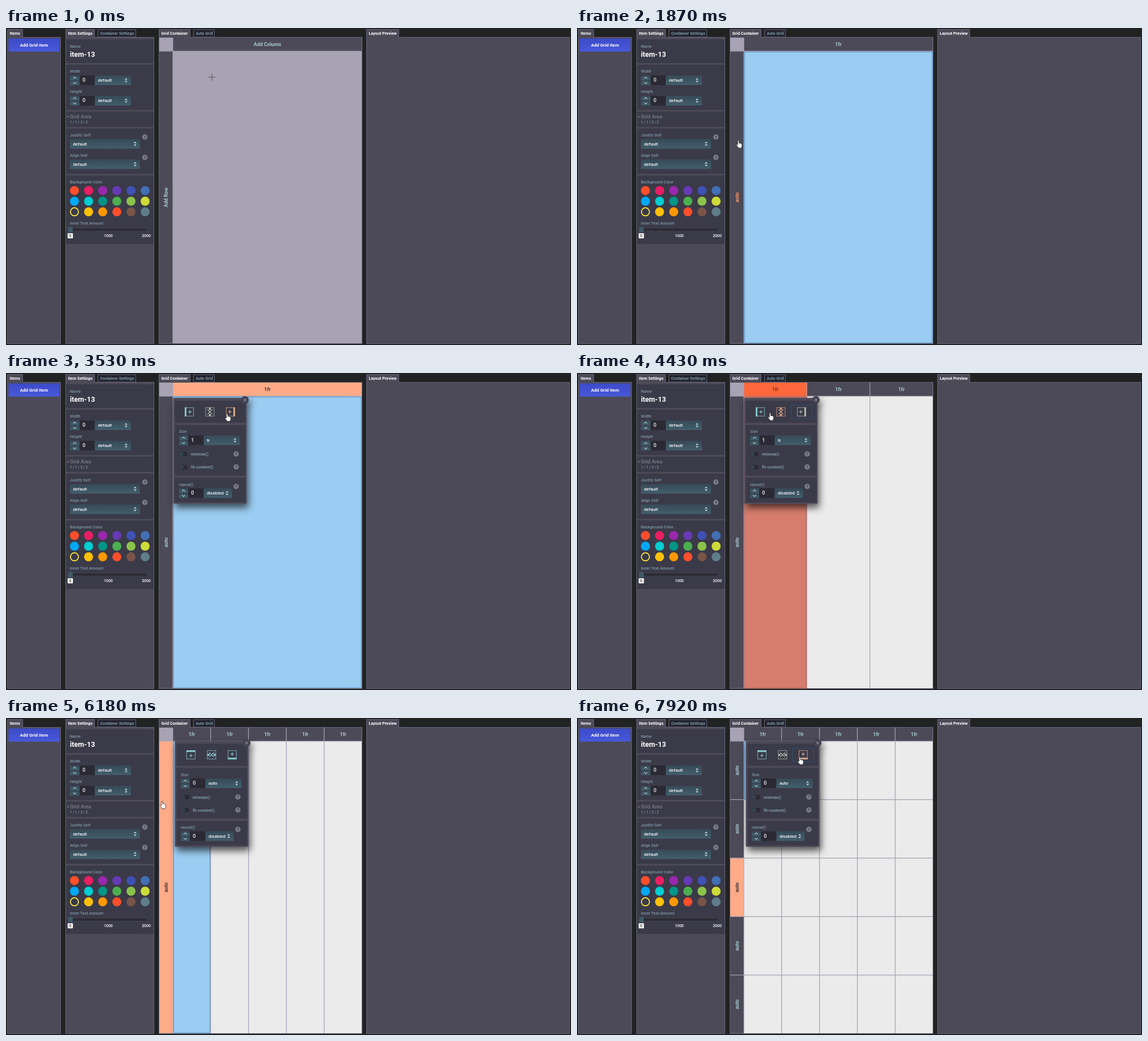
Recreate the animation shown at these times as an HTML page. Size 999 by 561 pixels, loop 8000 ms.

```html
<!DOCTYPE html>
<html lang="en">
<head>
<meta charset="utf-8">
<title>Grid editor</title>
<style>
html, body { margin: 0; width: 100%; height: 100%; overflow: hidden; background: #212323; }
svg { display: block; width: 100vw; height: 100vh; }
text { font-family: Roboto, Arial, sans-serif; white-space: pre; }
</style>
</head>
<body>
<svg viewBox="0 0 999 561" xmlns="http://www.w3.org/2000/svg">
  <defs>
    <linearGradient id="teal" x1="0" y1="0" x2="0" y2="1">
      <stop offset="0" stop-color="#374a57"/><stop offset="1" stop-color="#425e6c"/>
    </linearGradient>
    <linearGradient id="blue" x1="0" y1="0" x2="0" y2="1">
      <stop offset="0" stop-color="#3d4bc8"/><stop offset="1" stop-color="#4758da"/>
    </linearGradient>
    <filter id="shadow" x="-20%" y="-20%" width="140%" height="150%">
      <feDropShadow dx="3" dy="7" stdDeviation="6.5" flood-color="#000" flood-opacity=".65"/>
    </filter>
  </defs>
  <g id="base"></g>
  <g id="live"></g>
</svg>
<script>
const LOOP = 8000, STEP = 88;
const PANEL = '#4d4a58', SECTION = '#3b3a48', DARK = '#2b2a34', EDGE = '#666278', GAP = '#a7a3b4';
const MUTED = '#7e98a6', TEAL = '#86c5cb', HEAD = '#a6c9d0', CORAL = '#ffab87', ORANGE = '#ff9a68', RED = '#ff4713';

const rect = (x, y, w, h, fill, more = '') =>
  `<rect x="${x}" y="${y}" width="${w}" height="${h}" fill="${fill}" ${more}/>`;
const line = (d, color, width = 1) =>
  `<path d="${d}" fill="none" stroke="${color}" stroke-width="${width}"/>`;
const text = (x, y, s, size = 7.2, fill = MUTED, weight = 500, more = '') =>
  `<text x="${x}" y="${y}" font-size="${size}" fill="${fill}" font-weight="${weight}" ${more}>${s}</text>`;
const mid = 'text-anchor="middle"';

const rgb = c => [1, 3, 5].map(i => parseInt(c.slice(i, i + 2), 16));
function mix(a, b, t) {
  const p = rgb(a), q = rgb(b);
  return `rgb(${p.map((v, i) => Math.round(v + (q[i] - v) * t))})`;
}

// Widgets
const arrows = (x, y) =>
  `<path d="M${x - 2.6} ${y - 1}l2.6 -3l2.6 3zM${x - 2.6} ${y + 1}l2.6 3l2.6 -3z" fill="#b9cdd4"/>`;
const select = (x, y, w, label) =>
  rect(x, y, w, 17, 'url(#teal)') + text(x + 5.4, y + 11, label, 7.9, '#f2f4f6') + arrows(x + w - 8.7, y + 8.5);
const help = (x, y) =>
  `<circle cx="${x}" cy="${y}" r="4.7" fill="#7d7b8b"/>` + text(x, y + 2.7, '?', 7.5, SECTION, 700, mid);
function spinner(x, y, value, w = 17) {
  const c = x + w / 2;
  return rect(x, y, w, 8.2, 'url(#teal)') + rect(x, y + 9, w, 8, 'url(#teal)') +
    line(`M${c - 2.8} ${y + 5.4}l2.8 -2.6l2.8 2.6M${c - 2.8} ${y + 11.8}l2.8 2.6l2.8 -2.6`, '#b9cdd4', 1.1) +
    rect(x + w, y, 44 - w, 17, DARK) + text(x + w + 5.2, y + 11.3, value, 9, '#f2f4f6');
}
const toggle = (x, y) =>
  rect(x, y - 4, 15, 8, DARK, 'rx="4"') + `<circle cx="${x + 4}" cy="${y}" r="3.8" fill="#354350"/>`;

function tab(x, w, label, active) {
  return active
    ? rect(x + .5, 2.5, w - 1, 14, PANEL, `stroke="${EDGE}"`) + rect(x + 1, 15, w - 2, 3, PANEL) +
      text(x + 4.6, 12.2, label, 7.2, '#fff', 700)
    : rect(x + .5, 3, w - 1, 13, '#22232e', `stroke="${EDGE}"`) + text(x + 4.4, 12.2, label, 7.2, MUTED, 700);
}
const panel = (x, w, fill = PANEL) => rect(x + .5, 16.5, w - 1, 542, fill, `stroke="${EDGE}"`);

function drawBase() {
  const swatches = ('ff4e2b ea1e63 9b27af 673ab6 3f51b5 426fb5 02a8f3 00ced1 009587 ' +
    '4caf50 8bc34a cddc39 ring ffc107 ff9800 ff4e2b 795548 607d8b').split(' ');
  let s = panel(2, 95) + panel(105, 157) + panel(270, 360, GAP) + panel(637, 360);
  s += tab(2, 28, 'Items', true) + tab(105, 52, 'Item Settings', true) + tab(162, 68, 'Container Settings') +
    tab(270, 56, 'Grid Container', true) + tab(331, 38, 'Auto Grid') + tab(637, 58, 'Layout Preview', true);
  s += rect(271, 17, 24, 24, GAP);
  s += rect(4.5, 18.5, 90, 23.2, 'url(#blue)') + text(49.5, 32.7, 'Add Grid Item', 8, '#fff', 700, mid);
  for (const [y, h] of [[20, 42], [65, 80], [148, 27], [178, 80], [261, 121]]) s += rect(106, y, 155, h, SECTION);
  s += text(113, 35, 'Name') + text(113, 50.6, 'item-13', 12.5, '#fff', 700);
  [['Width', 84], ['Height', 120]].forEach(([label, y]) => {
    s += text(113, y - 4.8, label) + spinner(113, y, 0) + select(157, y, 64, 'default');
  });
  s += `<path d="M108.5 154.8l2.4 2.2l-2.4 2.2z" fill="#858393"/>` +
    text(113, 160.3, 'Grid Area', 9, '#7b7b8b') + text(113, 169, '1 / 1 / 2 / 2', 6.4);
  [['Justify Self', 196.5], ['Align Self', 232.5]].forEach(([label, y]) => {
    s += text(113, y - 4.3, label) + select(113, y, 124, 'default') + help(245.5, y - 3.5);
  });
  s += text(113, 275, 'Background Color');
  swatches.forEach((c, i) => {
    const at = `cx="${121 + (i % 6) * 25}" cy="${287.7 + Math.floor(i / 6) * 18.8}"`;
    s += c === 'ring' ? `<circle ${at} r="7.1" fill="none" stroke="#ffeb3b" stroke-width="1.7"/>`
      : `<circle ${at} r="8" fill="#${c}"/>`;
  });
  s += text(113, 347.8, 'Inner Text Amount') + rect(113, 355, 135, 3.6, DARK) + rect(109.7, 352, 8.3, 9.5, '#405967') +
    rect(109, 363.3, 9.3, 9, '#fff', 'rx="1"');
  for (let i = 0; i < 3; i++) s += text(113.7 + i * 67.2, 370.4, i * 1000, 7, i ? '#fff' : '#333', 500, mid);
  return s;
}

// kind: 0 insert before, 1 delete, 2 insert after
function icon(kind, x, y, color, isRow) {
  const side = kind - 1;
  const inner = kind === 1
    ? rect(-1.7, -7.5, 3.4, 4, color) + rect(-1.7, 3.5, 3.4, 4, color) + line('M-4.2 -4.2L4.2 4.2M4.2 -4.2L-4.2 4.2', color, 1.2)
    : rect(side < 0 ? -8 : 5, -8, 3, 16, color) + line(`M${-side * 1.3 - 3} 0h6M${-side * 1.3} -3v6`, color, 1.2);
  return `<g transform="translate(${x} ${y}) rotate(${isRow ? 90 : 0})">` +
    rect(-7.5, -7.5, 15, 15, 'none', `stroke="${color}" stroke-width=".8"`) + inner + '</g>';
}
const iconX = kind => 324 + kind * 36.5, ICON_Y = 68.7;
const popupShift = open => open === 'row' ? [3, -3.5] : [0, 0];

function popup(open, heat, focus) {
  const isRow = open === 'row';
  let s = `<g transform="translate(${popupShift(open)})">`;
  s += `<g filter="url(#shadow)">${rect(295.5, 44, 130, 187.5, PANEL, 'rx="2"')}` +
    `<circle cx="422.5" cy="47.7" r="6.7" fill="#454351"/></g>`;
  s += rect(298.5, 49, 125, 39, SECTION) + rect(298.5, 92, 125, 89.5, SECTION) + rect(298.5, 185.5, 125, 43.5, SECTION);
  s += `<circle cx="422.5" cy="47.7" r="6.7" fill="#454351"/>` + line('M420 45.2l5 5M425 45.2l-5 5', '#a9b9c2');
  heat.forEach((h, kind) => {
    const x = iconX(kind);
    if (kind === focus) s += rect(x - 18.5, 57, 37, 23.5, 'none', 'stroke="#2b5478" stroke-width=".9"');
    s += icon(kind, x, ICON_Y, mix(TEAL, ORANGE, h), isRow);
  });
  s += text(306, 106.3, 'Size') + spinner(306, 110.5, isRow ? 0 : 1, 16) + select(349.5, 110.5, 64, isRow ? 'auto' : 'fr');
  [['minmax()', 143.5], ['fit-content()', 166.5]].forEach(([label, y]) => {
    s += toggle(306, y) + text(327, y + 2.5, label, 7.2, MUTED, 700) + help(407, y - .3);
  });
  s += text(306, 199.6, 'repeat()') + spinner(306, 204, 0, 16) + select(349.5, 204, 50, 'disabled') + help(407, 200.7);
  return s + '</g>';
}

// Pointer moves: start tick, end tick, destination
const moves = [
  [0, 2, 367, 78], [4, 8, 448, 29], [10, 13, 385, 116], [13, 17, 286, 285], [18, 23, 285, 152],
  [23, 27, 457, 29], [30, 31, 397, 66], [31, 34, 370, 65], [36, 39, 391, 72], [46, 52, 324, 70],
  [61, 67, 276, 147], [71, 75, 394, 69], [77, 81, 330, 68], [86, 88, 394, 69]
];
const clicks = [
  [10, 'addCol'], [18, 'addRow'], [30, 'openCol'], [42, 'after'], [46, 'after'], [55, 'before'], [58, 'before'],
  [68, 'openRow'], [75, 'after'], [82, 'before'], [85, 'before'], [89, 'after']
];

function pointerAt(n) {
  let x = 364, y = 87;
  for (const [from, to, toX, toY] of moves) {
    const t = Math.min(1, Math.max(0, (n - from) / (to - from))), e = t * t * (3 - 2 * t);
    x += (toX - x) * e;
    y += (toY - y) * e;
  }
  return [x, y];
}

// Replays the clicks made so far
function stateAt(n) {
  const st = { col: 0, row: 0, open: '', active: 0, focus: -1 };
  for (const [tick, action] of clicks) {
    if (tick > n) break;
    if (action === 'addCol') st.col = 1;
    else if (action === 'addRow') st.row = 1;
    else if (action === 'openCol' || action === 'openRow') {
      st.open = action.slice(4).toLowerCase();
      st.active = 0;
      st.focus = -1;
    } else {
      st[st.open]++;
      if (action === 'before') st.active++;
      st.focus = action === 'before' ? 0 : 2;
    }
  }
  return st;
}

function overIcon(kind, n) {
  const { open } = stateAt(n), [x, y] = pointerAt(n), [dx, dy] = popupShift(open);
  return open && Math.abs(x - dx - iconX(kind)) < 18.3 && Math.abs(y - dy - ICON_Y) < 12 ? 1 : 0;
}
// Hover transitions last three ticks
const heatAt = (kind, n) => (overIcon(kind, n) + overIcon(kind, n - 1) + overIcon(kind, n - 2)) / 3;

function cursor([x, y], cross) {
  if (cross) return line(`M${x - 6.5} ${y}h13M${x} ${y - 6.5}v13`, '#5a5751', 1.1);
  return `<path transform="translate(${x} ${y})" d="M-1.2 .8Q0 -.8 1.2 .8V5Q2.6 4.3 3.2 5.3Q4.5 4.8 4.9 5.9Q6.4 5.7 6.4 7.2V10
    Q6.2 11.6 5.3 12.6V13.6H-.3V12.6Q-2.2 10.7 -3.6 8.2Q-3.8 6.6 -2.3 7L-1.2 8Z" fill="#fff" stroke="#222" stroke-width=".8"/>`;
}

function drawLive(n) {
  const { col, row, open, active, focus } = stateAt(n);
  const at = pointerAt(n), inHead = at[1] < 41, inSide = at[0] < 295;
  const cols = col || 1, rows = row || 1, w = 334.5 / cols, h = 517.5 / rows;
  const red = heatAt(1, n);
  const isActive = (kind, i) => open === kind && active === i;
  const headFill = on => on ? mix(CORAL, RED, red) : PANEL;
  const headInk = (on, hover) => on ? mix('#40303a', '#c4380c', red * red) : hover ? ORANGE : HEAD;
  const danger = (x, y, w, h) => rect(x, y, w, h, RED, `opacity="${red * .89}"`);
  let s = '';

  for (let r = 0; r < rows; r++) {
    const y = 41 + r * h, cy = y + h / 2, on = isActive('row', r);
    s += rect(271, y + .5, 23.6, h - 1.2, headFill(on)) +
      text(286, cy, row ? 'auto' : 'Add Row', 8.75, headInk(on, inSide && !inHead), 700,
        `${mid} transform="rotate(-90 286 ${cy})"`);
    for (let c = 0; row && c < cols; c++) {
      const x = 295 + c * w, first = !r && !c;
      s += rect(x + .6, y + .6, w - 1.3, h - 1.3, first ? '#9bccf1' : '#ebebeb');
      if (first) s += rect(x + 1.5, y + 1.5, w - 3, h - 3, 'none', 'stroke="#5596cf"');
    }
    if (on) s += danger(295, y, 334.5, h);
  }
  for (let c = 0; c < cols; c++) {
    const x = 295 + c * w, on = isActive('col', c);
    if (on) s += danger(x + .5, 40.5, w - 1, 518);
    s += rect(x + .5, 17, w - 1.2, 23.5, headFill(on)) +
      text(x + w / 2, 32.4, col ? '1fr' : 'Add Column', 8.75, headInk(on, inHead && !inSide), 700, mid);
  }
  if (open) s += popup(open, [0, 1, 2].map(kind => heatAt(kind, n - 1)), focus);
  return s + cursor(at, !row && !inHead && !inSide);
}

const live = document.getElementById('live');
document.getElementById('base').innerHTML = drawBase();
let shown = -1;
function update(now) {
  const n = Math.min(90, Math.floor((now % LOOP + 10) / STEP));
  if (n !== shown) live.innerHTML = drawLive(shown = n);
}
const start = performance.now();
function loop() {
  update(performance.now() - start);
  requestAnimationFrame(loop);
}
loop();
</script>
</body>
</html>
```
